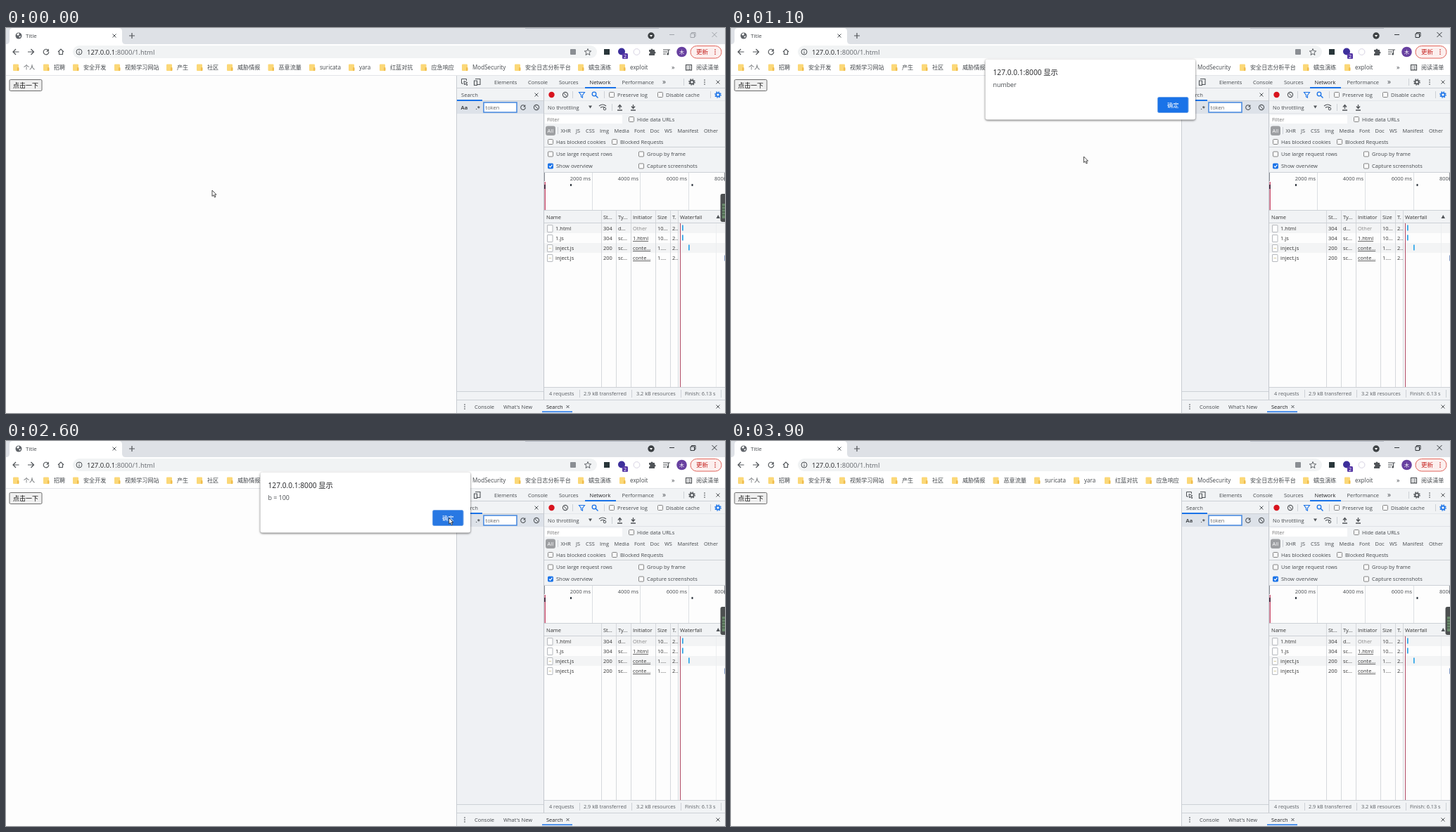
Animation, 1022 px wide and 548 px high, one loop 4 s. Source, as an HTML page:

```html
<!DOCTYPE html>
<html lang="zh-CN">
<head>
<meta charset="utf-8">
<title>Title</title>
<style>
html, body { margin: 0; width: 100%; height: 100%; overflow: hidden; background: #fdfdfd; }
svg { display: block; width: 1022px; height: 548px; }
text { font-family: 'Open Sans', 'Noto Sans CJK SC', 'Noto Sans CJK', sans-serif; white-space: pre; }
</style>
</head>
<body>
<svg id="stage" viewBox="0 0 1022 548"></svg>
<script>
const stage = document.getElementById('stage');
let out = '';
const add = s => { out += s; };
const text = (x, y, s, size = 7.6, fill = '#45494d', more = '') =>
  add(`<text x="${x}" y="${y}" font-size="${size}" fill="${fill}" ${more}>${s}</text>`);
const rect = (x, y, w, h, fill, more = '') =>
  add(`<rect x="${x}" y="${y}" width="${w}" height="${h}" fill="${fill}" ${more}/>`);
const path = (d, stroke = '#505458', w = 1, fill = 'none') =>
  add(`<path d="${d}" stroke="${stroke}" stroke-width="${w}" fill="${fill}"/>`);
const disc = (x, y, r, fill, more = '') =>
  add(`<circle cx="${x}" cy="${y}" r="${r}" fill="${fill}" ${more}/>`);
const ring = (x, y, r, color = '#505458', w = 1) =>
  disc(x, y, r, 'none', `stroke="${color}" stroke-width="${w}"`);
const hline = (x, y, w, fill = '#cdd1d6') => rect(x, y, w, 1, fill);
const vline = (x, y, h, fill = '#cdd1d6') => rect(x, y, 1, h, fill);
const cross = (x, y, r = 2.5, color) =>
  path(`M${x - r} ${y - r}l${2 * r} ${2 * r}m0 ${-2 * r}l${-2 * r} ${2 * r}`, color);
const dots = (x, y, color = '#505458') => [-3, 0, 3].forEach(d => disc(x, y + d, .85, color));
const reload = (x, y, r) => {
  path(`M${x + r} ${y}A${r} ${r} 0 1 1 ${x + r * .7} ${y - r * .7}`, '#505458', 1.1);
  path(`M${x + r} ${y - r - .6}v${r}h${-r}z`, 'none', 0, '#505458');
};
const ban = (x, y) => { ring(x, y, 3.6, '#505458', 1.1); path(`M${x - 2.5} ${y - 2.5}l5 5`); };
const gear = (x, y, color) => {
  ring(x, y, 2.7, color, 1.8);
  disc(x, y, 4.2, 'none', `stroke="${color}" stroke-width="1.2" stroke-dasharray="1.65"`);
};
const check = (x, y, label, on) => {
  const edge = on ? '#1a73e8' : '#777';
  rect(x + .5, y - 3.5, 7, 7, on ? edge : '#fff', `rx="1" stroke="${edge}" stroke-width=".9"`);
  if (on) path(`M${x + 2} ${y}l1.6 1.7l2.8-3.5`, '#fff', 1.1);
  text(x + 12, y + 2.8, label, 7.5);
};
const group = (id, draw) => { add(`<g id="${id}">`); draw(); add('</g>'); };

function browser() {
  rect(0, 0, 1022, 23, '#dee1e6');
  path('M0 23Q5 23 5 18V5Q5 0 10 0H160Q165 0 165 5V18Q165 23 170 23z', 'none', 0, '#fff');
  hline(738, 0, 190, '#b9bdc7');
  disc(18, 11, 4.5, '#5f6368');
  path('M15 9l3-2l1 2l-2 2zM18 12l3-1l-1 3z', 'none', 0, '#fff');
  text(28, 14.2, 'Title', 8);
  cross(154, 11);
  path('M175 11h8m-4-4v8', '#505458', 1.2);
  disc(917, 11, 4.7, '#3c4043');
  path('M914.8 10h4.4l-2.2 2.8z', 'none', 0, '#fff');
  add('<g id="controls" fill="none">');
  add('<path d="M943 9.5h7M973 8h5.5v5.5H973zM974.5 8V6.5h5.5V12h-1.5M1003.5 6l7 7m0-7l-7 7"/></g>');

  rect(0, 23, 1022, 45, '#fff');
  rect(95, 25, 745, 18, '#f1f3f4', 'rx="9"');
  path('M18.5 34H10m4-4l-4 4l4 4M31 34h8.5m-4-4l4 4l-4 4', '#505458', 1.2);
  reload(57, 34, 3.8);
  path('M74 34l4-4l4 4M75.5 33.5v4h5v-4', '#505458', 1.1);
  ring(104, 34, 4);
  path('M104 33.5v3M104 31.3v1');
  text(115, 37.6, '127.0.0.1<tspan fill="#62666b">:8000/1.html</tspan>', 9.5, '#202124');
  rect(802, 30, 8, 8, '#8a8e93', 'rx="1"');
  path('M827 29.5l1.3 3.2l3.4.2l-2.6 2.2l.8 3.4l-2.9-1.9l-2.9 1.9l.8-3.4l-2.6-2.2l3.4-.2z', '#505458', .9);
  rect(850, 30, 8, 8, '#29363a');
  disc(875, 33.5, 5, '#3d2f9b');
  rect(876, 36, 8, 8, '#5637a6', 'rx="1.5"');
  text(878, 42.6, '2', 7, '#fff');
  ring(896.5, 34, 4.4, '#d7d3e3');
  path('M914 31h2.5a1.5 1.5 0 0 1 3 0h2.5v2.5a1.5 1.5 0 0 1 0 3V39h-8v-2.5a1.5 1.5 0 0 0 0-3z', 'none', 0, '#505458');
  path('M934 31h7M934 34h6M934 37h4M941.5 37v-6h2.5', '#505458', 1.2);
  disc(940.7, 37, 1.5, '#505458');
  disc(960.5, 34, 7.3, '#6740a0');
  text(957, 36.6, '木', 7, '#fff');
  rect(973, 25.5, 44, 17.5, '#fcefee', 'rx="8.7" stroke="#e0635a"');
  text(981, 37.2, '更新', 8.5, '#c5221f');
  dots(1008, 34, '#c5221f');

  const marks = [[10, '个人'], [53, '招聘'], [95, '安全开发'], [154, '视频学习网站'], [228, '产生'],
    [271, '社区'], [314, '威胁情报'], [372.5, '恶意流量'], [431, 'suricata'], [487, 'yara'], [531, '红蓝对抗'],
    [589.5, '应急响应'], [648, 'ModSecurity'], [723, '安全日志分析平台'], [813, '蠕虫演练'], [872, 'exploit']];
  for (const [x, name] of marks) {
    rect(x, 51.5, 8, 9.5, '#fbd878', 'rx="1"');
    rect(x + 6, 56, 2.5, 5, '#f0bd4d', 'rx="1"');
    text(x + 15, 59, name, 8.1);
  }
  text(946, 59, '»', 9);
  rect(966.5, 52.5, 8, 7.5, 'none', 'stroke="#505458" stroke-width="1.2"');
  path('M968 54.5h1m1 0h3M968 56.5h1m1 0h3M968 58.5h1m1 0h3', '#505458', .8);
  text(981, 59, '阅读清单', 8.1);
  hline(0, 67, 1022, '#e3e5e8');
  rect(0, 68, 641, 480, '#fdfdfd');
  rect(5, 73.5, 46, 16, '#efefef', 'rx="1.5" stroke="#6d6d6d"');
  text(10, 85.4, '点击一下', 9, '#111');
}

function searchPane() {
  rect(641, 68, 381, 480, '#f1f3f5');
  vline(640, 68, 480, '#c9cdd3');
  hline(641, 85, 381);
  path('M650 79h-2.5v-6.5h7v2.5M651 75.5l5 2.2l-2 .8l2 2.5l-1 .8l-2-2.5l-1.3 1.7z');
  path('M667 72.5h7v8h-4M665.5 75h4v6.5h-4z', '#505458', 1.1);
  [[694, 'Elements'], [742, 'Console'], [786, 'Sources'], [829.5, 'Network'], [875.5, 'Performance']]
    .forEach(([x, s]) => text(x, 79.7, s, 7.5, s == 'Network' ? '#202124' : undefined));
  rect(823, 84, 44, 2, '#1a73e8');
  text(933, 80, '»', 10);
  vline(963, 72, 10);
  gear(975, 77, '#505458');
  dots(993, 77);
  cross(1012, 77);

  text(647, 98, 'Search');
  cross(754, 95);
  hline(641, 103, 123);
  rect(641, 102, 36, 2, '#1a73e8');
  rect(641, 104, 123, 18, '#dde2e9');
  text(646.5, 116, 'Aa', 7.5, '#45494d', 'font-weight="700"');
  text(667.5, 116, '.*', 7.6, '#45494d', 'font-weight="700"');
  rect(679, 106, 47, 14, '#fff', 'stroke="#4d8de0" stroke-width="1.6"');
  text(681.5, 116, 'token', 7.5, '#666');
  reload(735, 113, 3.3);
  ban(754, 113);
  rect(641, 122, 123, 395, '#eff1f4');
  hline(641, 517, 123);
  vline(764, 86, 444, '#c4c8ce');
}

function networkTools() {
  disc(775.5, 95, 4.2, '#d8141e');
  ban(795, 95);
  [805, 850].forEach(x => vline(x, 90, 10));
  path('M814.5 91.5h8l-3 4v3.5l-2-1v-2.5z', '#1a73e8', 1.1);
  ring(836, 94, 2.8, '#1a73e8', 1.3);
  path('M838 96l3.5 3.5', '#1a73e8', 1.4);
  check(857, 95, 'Preserve log');
  check(926, 95, 'Disable cache');
  vline(1001, 90, 10);
  gear(1012, 95, '#1a73e8');
  hline(765, 103, 257, '#e3e6ea');

  text(770, 115.7, 'No throttling', 7.5);
  path('M828 110.5h5l-2.5 4z', 'none', 0, '#505458');
  path('M843 111q5-4 10 0M845 113.5q3-2.5 6 0', '#505458', 1.2);
  ring(851, 115, 1.8);
  vline(861, 108, 10);
  path('M872.5 115v-5m-2.5 2.5l2.5-3l2.5 3M869 117h7M891.5 109v5m-2.5-2.5l2.5 3l2.5-3M888 117h7', '#505458', 1.3);
  hline(765, 121, 257, '#dfe2e6');

  rect(766, 124, 110, 12, '#fff');
  text(769, 132.8, 'Filter', 7.5, '#777');
  check(885, 130, 'Hide data URLs');
  rect(767, 139.5, 14, 13.5, '#9d9fa2', 'rx="3"');
  text(769.5, 148.8, 'All', 7.5, '#fff');
  vline(784, 141, 10);
  [[788.5, 'XHR'], [810, 'JS'], [824, 'CSS'], [844, 'Img'], [864.5, 'Media'], [893, 'Font'], [915.5, 'Doc'],
    [936, 'WS'], [954.5, 'Manifest'], [992, 'Other']].forEach(([x, s]) => text(x, 148.8, s, 7.4));
  check(770, 162, 'Has blocked cookies');
  check(861, 162, 'Blocked Requests');
  hline(765, 169, 257);
  check(770, 179.5, 'Use large request rows');
  check(899, 179.5, 'Group by frame');
  check(770, 196.5, 'Show overview', true);
  check(899, 196.5, 'Capture screenshots');
}

function timeline() {
  rect(765, 205, 257, 55, '#fdfdfd');
  hline(765, 205, 257);
  [833, 901, 970].forEach((x, i) => {
    vline(x, 206, 54, '#dcdfe3');
    text(x - 2, 217, `${i * 2 + 2}000 ms`, 7.4, '#45494d', 'text-anchor="end"');
  });
  text(1007, 217, '8000 ms', 7.4);
  vline(765, 206, 12, '#8b8f96');
  vline(765, 219, 41, '#d9a3b4');
  vline(766, 219, 41, '#c94f6d');
  rect(765, 223, 2, 6, '#54354a');
  rect(802, 222, 2, 3, '#333a42');
  rect(974.5, 222, 2, 3, '#333a42');
  vline(1021, 206, 12, '#8b8f96');
}

function requests() {
  rect(765, 260, 257, 18, '#f1f3f5');
  hline(765, 259, 257);
  rect(765, 278, 257, 234, '#fdfdfd');
  const cells = [849, 870, 891, 926, 947];
  const rows = [['1.html', '304', 'd...', 'Other', '10...', '2..'], ['1.js', '304', 'sc...', '1.html', '10...', '2..'],
    ['inject.js', '200', 'sc...', 'conte...', '1....', '2..'], ['inject.js', '200', 'sc...', 'conte...', '1....', '2..']];
  rows.forEach(([name, ...rest], i) => {
    const y = 278 + i * 14;
    if (i % 2 == 0) rect(765, y, 257, 14, '#f3f4f5');
    rect(769.5, y + 2.5, 7.5, 10, '#fff', 'stroke="#aeb2b7" stroke-width=".9" rx=".5"');
    if (i > 1) rect(771.5, y + 7, 3.5, 1, '#d5cba2');
    text(781, y + 10.3, name, 7.5, '#333');
    rest.forEach((s, k) => text(cells[k], y + 10.3, s, 7.4, k == 2 && !i ? '#888' : '#333',
      k == 2 && i ? 'text-decoration="underline"' : ''));
    const last = i == 3;
    rect([961, 961, 970, 1021][i], y + (last ? 3.5 : 2.5), 1.7, 8, last ? '#7f98c4' : '#2ea5e8');
  });
  [846, 867, 888, 923, 944, 955].forEach(x => vline(x, 260, 252, '#d5d8dc'));
  vline(1009, 278, 234, '#eceef0');
  hline(765, 277, 257);
  vline(958, 278, 234, '#b04a65');
  text(768, 271.8, 'Name', 7.5, '#333');
  ['St...', 'Ty...', 'Initiator', 'Size', 'T.'].forEach((s, i) => text(cells[i], 271.8, s, 7.5, '#333'));
  text(958, 271.8, 'Waterfall', 7.5, '#333');
  path('M1009.5 271h5.5l-2.75-5z', 'none', 0, '#505458');

  rect(765, 512, 257, 18, '#f1f3f5');
  hline(765, 511, 257);
  [[772, '4 requests'], [821, '2.9 kB transferred'], [896, '3.2 kB resources'], [965, 'Finish: 6.13 s']]
    .forEach(([x, s]) => text(x, 523.2, s, 7.3, '#5b5f64'));
  [815, 889, 959, 1016].forEach(x => vline(x, 515, 11));
  hline(641, 529, 381);
  rect(641, 530, 381, 18, '#f1f3f5');
  dots(652, 539);
  text(666, 541.8, 'Console', 7.5);
  text(707, 541.8, "What's New", 7.5);
  text(768, 541.8, 'Search', 7.5, '#202124');
  cross(798.5, 539, 2);
  rect(762, 545.5, 43, 1.5, '#1a73e8');
  cross(1012, 539);
}

function overlays() {
  group('widget', () => {
    rect(1015.5, 236, 12, 40, '#4c4f50', 'rx="3"');
    rect(1018, 250, 4, 21, '#69896b');
    path('M1018 254h4m-4 4h4m-4 4h4m-4 4h4', '#3c4d3e');
  });
  group('dialog', () => {
    rect(361.5, 44.5, 298.5, 86, '#fff', 'rx="3" style="filter:drop-shadow(0 1px 1.5px #0009)"');
    text(372.5, 66.5, '127.0.0.1:8000 显示', 10.2, '#202124');
    text(372.5, 84.2, '', 8.9, '#45494d', 'id="message"');
    rect(606.5, 98.5, 43.5, 22, '#1a73e8', 'id="ok" rx="2" stroke="#70a4e8"');
    text(620, 112.6, '确定', 8.3, '#fff');
  });
  group('lens', () => {
    rect(633, 79, 20, 20.5, '#f0494d', 'rx="3"');
    ring(642.5, 88.5, 4.5, '#fff', 1.2);
    path('M646 92l3 3', '#fff', 1.4);
  });
  group('cursor', () => path('M0 0V8.5L2 6.7L3.5 10L5 9.3L3.5 6.2H6z', '#222', .8, '#fff'));
}

[browser, searchPane, networkTools, timeline, requests, overlays].forEach(draw => draw());
stage.innerHTML = out;

const $ = id => document.getElementById(id);
const show = (id, on) => $(id).setAttribute('visibility', on ? 'visible' : 'hidden');

// Pointer tip as [ms, x, y]
const moves = [[0, 293, 231], [600, 15, 90], [700, 16, 85], [800, 16, 85], [1100, 501.5, 183], [1200, 510, 180],
  [1600, 633, 108], [2300, 633, 108], [2800, 627.5, 110.5], [3600, 627.5, 110.5], [3800, 819, 358], [4000, 819, 358]];

function pointer(t) {
  const i = moves.findIndex(m => m[0] > t);
  const [a, b] = [moves[i - 1], moves[i]];
  const p = (t - a[0]) / (b[0] - a[0]);
  return [1, 2].map(k => a[k] + (b[k] - a[k]) * p);
}

function frame(now) {
  const t = Math.floor(now % 4000 / 100) * 100;
  const lens = t >= 2100 && t < 2400;
  $('cursor').setAttribute('transform', `translate(${pointer(t)})`);
  show('cursor', t < 3900);
  show('dialog', t >= 800 && t < 3400);
  show('lens', lens);
  show('widget', t < 800 || t >= 1700);
  $('message').textContent = t < 1900 ? 'number' : t < 2500 ? '10' : 'b = 100';
  $('ok').setAttribute('fill', lens ? '#3a7bd5' : t < 1500 ? '#1a73e8' : '#2878e3');
  $('controls').setAttribute('stroke', t < 800 ? '#a0a4aa' : '#33373b');
  requestAnimationFrame(frame);
}
frame(performance.now());
</script>
</body>
</html>
```
